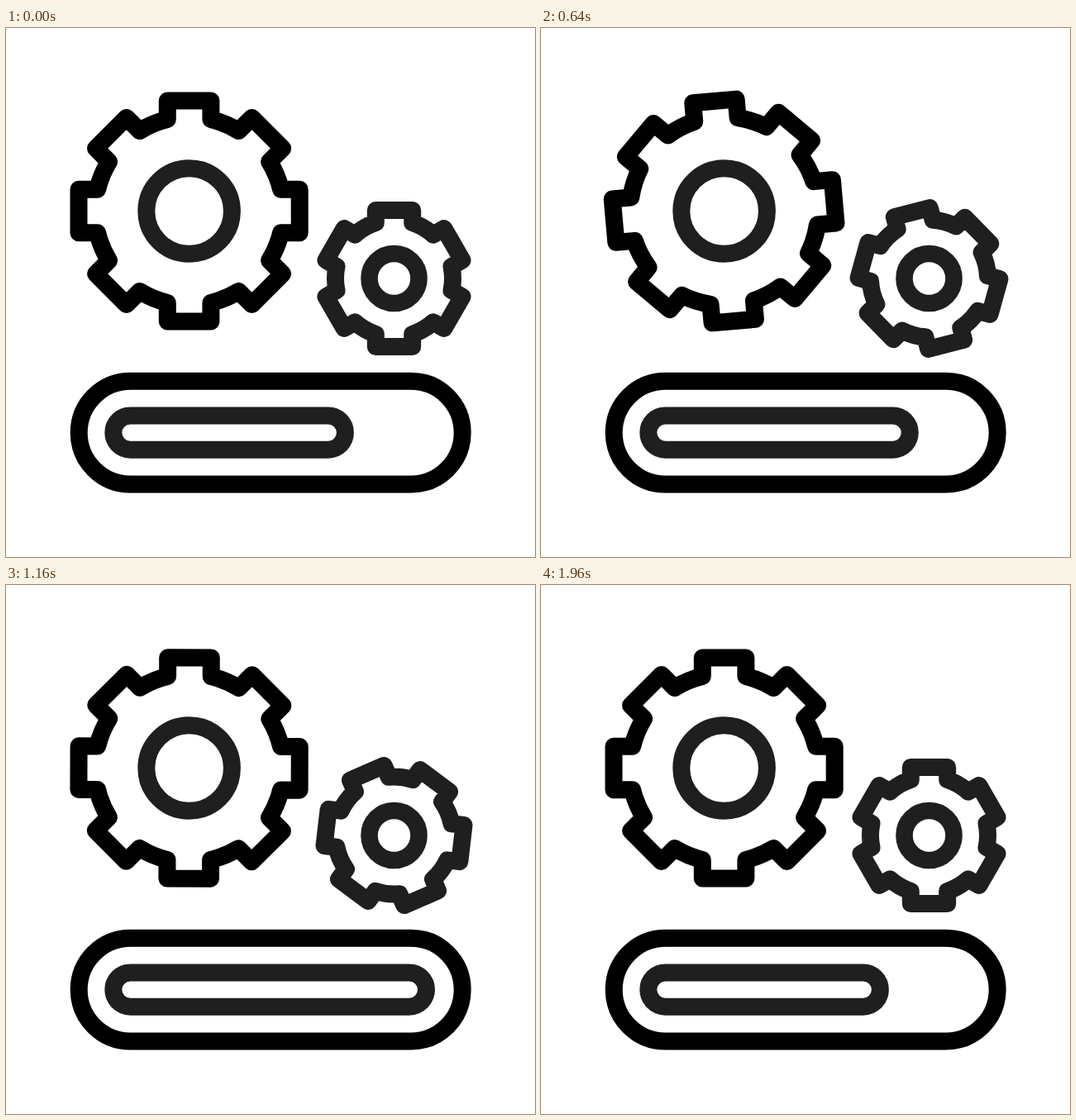
Recreate the animation shown at these times as an HTML page. Size 640 px wide and 640 px high, loop 2000 ms.

```html
<!DOCTYPE html>
<html>
<head>
<meta charset="utf-8">
<style>
html, body { margin: 0; width: 100%; height: 100%; overflow: hidden; background: #fff; }
svg { display: block; width: 100vw; height: 100vh; }
</style>
</head>
<body>
<svg viewBox="0 0 640 640" fill="none" stroke="#000" stroke-width="21" stroke-linejoin="round">
  <path id="big"/>
  <circle cx="221.6" cy="221.5" r="51.8" stroke="#1f1f1f"/>
  <rect x="88.2" y="427.2" width="464" height="124.8" rx="62.4"/>
  <g stroke="#1f1f1f">
    <path id="small"/>
    <circle cx="469.5" cy="303" r="30" stroke-width="20.6"/>
    <rect id="fill" x="129.8" y="469" height="41.2" rx="20.6"/>
  </g>
</svg>
<script>
const LOOP = 2000, STEP = 40;
const $ = id => document.getElementById(id);

// Closed outline: square teeth joined by arcs of the base circle.
function gearPath(teeth, half, top, base) {
  const foot = Math.sqrt(base * base - half * half);
  const corners = [[-half, -foot], [-half, -top], [half, -top], [half, -foot]];
  let d = '';
  for (let i = 0; i < teeth; i++) {
    const a = i * 2 * Math.PI / teeth, c = Math.cos(a), s = Math.sin(a);
    corners.forEach(([x, y], k) => {
      const link = k ? 'L' : i ? `A${base} ${base} 0 0 1 ` : 'M';
      d += `${link}${x * c - y * s} ${x * s + y * c}`;
    });
  }
  return d + `A${base} ${base} 0 0 1 ${-half} ${-foot}Z`;
}

// Smooth monotone curve through [time, value] keys, at rest at both ends.
function track(keys) {
  const rise = i => (keys[i + 1][1] - keys[i][1]) / (keys[i + 1][0] - keys[i][0]);
  const slopes = keys.map((_, i) => {
    if (!i || i === keys.length - 1) return 0;
    const a = rise(i - 1), b = rise(i);
    return a * b > 0 ? 2 * a * b / (a + b) : 0;
  });
  return t => {
    const last = keys.length - 1;
    if (t <= keys[0][0]) return keys[0][1];
    if (t >= keys[last][0]) return keys[last][1];
    const i = keys.findIndex(k => k[0] > t) - 1;
    const [t0, v0] = keys[i], [t1, v1] = keys[i + 1];
    const h = t1 - t0, u = (t - t0) / h, w = 1 - u;
    return v0 * w * w * (1 + 2 * u) + v1 * u * u * (3 - 2 * u)
      + h * u * w * (slopes[i] * w - slopes[i + 1] * u);
  };
}

const bigTurn = track([[180, 0], [320, 5], [640, 85], [1000, 260], [1320, 350], [1480, 360]]);
const smallTurn = track([[460, 0], [640, -14.5], [1000, -135.5], [1320, -268], [1640, -356.5], [1760, -360]]);
const fillWidth = track([[40, 280.6], [320, 286.3], [640, 316.5], [1000, 363.8], [1220, 380.6],
  [1320, 376.6], [1640, 343.8], [1960, 280.6]]);

$('big').setAttribute('d', gearPath(8, 26.3, 133.6, 114));
$('small').setAttribute('d', gearPath(6, 22.2, 82.5, 71));

function draw(now) {
  const t = Math.floor(now % LOOP / STEP) * STEP;
  $('big').setAttribute('transform', `translate(221.6 221.5) rotate(${bigTurn(t)})`);
  $('small').setAttribute('transform', `translate(469.5 303) rotate(${smallTurn(t)})`);
  $('fill').setAttribute('width', fillWidth(t));
}

const start = performance.now();
function tick() {
  draw(performance.now() - start);
  requestAnimationFrame(tick);
}
tick();
</script>
</body>
</html>
```
